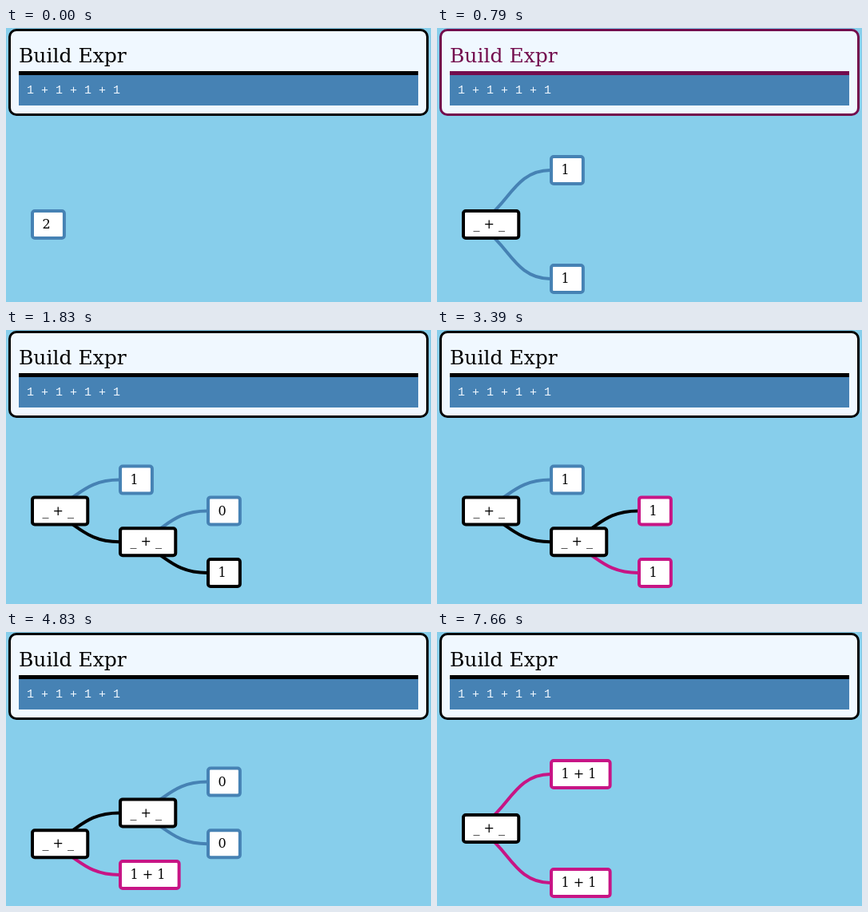
Write an HTML page that moves like this. It is 532 px wide and 343 px high and loops after 8000 ms.

```html
<!DOCTYPE html>
<html lang="en">
<head>
<meta charset="utf-8">
<title>Build Expr</title>
<style>
  html, body { margin: 0; width: 100%; height: 100%; overflow: hidden; background: #87ceeb; }
  svg { display: block; width: 532px; height: 343px; }
  text { font-family: "DejaVu Serif", serif; font-size: 16px; }
  .panel { fill: #f0f8ff; stroke: var(--ink, #000); stroke-width: 3; }
  .title { font-size: 25px; fill: var(--ink, #000); }
  .rule { fill: var(--ink, #000); }
  .code { font-family: "Liberation Mono", monospace; font-size: 15px; fill: #f0f8ff; }
  .edge { fill: none; stroke-width: 4; }
  .box { fill: #fff; stroke-width: 4; }
</style>
</head>
<body>
<svg viewBox="0 0 532 343">
  <rect class="panel" x="4.5" y="2.5" width="523" height="106" rx="8.5"/>
  <text class="title" x="16" y="43">Build Expr</text>
  <rect class="rule" x="16" y="54" width="500" height="5"/>
  <rect x="16" y="59" width="500" height="38" fill="#4682b4"/>
  <text class="code" x="26" y="82">1 + 1 + 1 + 1</text>
  <g id="edges"></g>
  <g id="nodes"></g>
</svg>
<script>
const LOOP = 8000, MOVE = 220;
const FLASH = { start: 30, half: 525 };
const COLORS = { todo: [70, 130, 180], open: [0, 0, 0], done: [199, 21, 133] };
const PARENT = { a0: 'a', a1: 'a', b0: 'b', b1: 'b', a: 'r', b: 'r', r: null };
const KEYS = Object.keys(PARENT);

// Vertical centres of the nodes for each tree shape
const single = { r: 246 };
const pair = { r: 246, a: 178, b: 314 };
const low = { r: 226.4, a: 187.6, b: 265.2, b0: 226.4, b1: 304 };
const high = { r: 265.2, a: 226.4, b: 304, a0: 187.6, a1: 265.2 };

const SUM = '_ + _';
const steps = [];
function step(time, layout, changes) {
  const last = steps[steps.length - 1];
  steps.push({ time, layout, nodes: { ...(last && last.nodes), ...changes } });
}
step(0, single, { r: ['2', 'todo'] });
step(470, pair, { r: [SUM, 'open'], a: ['1', 'todo'], b: ['1', 'todo'] });
step(1030, low, { b: [SUM, 'open'], b0: ['0', 'todo'], b1: ['0', 'todo'] });
step(1600, low, { b1: ['1', 'open'] });
step(2260, low, { b1: ['1', 'done'] });
step(2790, low, { b0: ['1', 'open'] });
step(3385, low, { b0: ['1', 'done'] });
step(3960, pair, { b: ['1 + 1', 'done'] });
step(4520, high, { a: [SUM, 'open'], a0: ['0', 'todo'], a1: ['0', 'todo'] });
step(5170, high, { a1: ['1', 'open'] });
step(5700, high, { a1: ['1', 'done'] });
step(6300, high, { a0: ['1', 'open'] });
step(6830, high, { a0: ['1', 'done'] });
step(7440, pair, { a: ['1 + 1', 'done'] });

const clamp = v => Math.max(0, Math.min(1, v));
const ease = v => v * v * (3 - 2 * v);
const lerp = (a, b, p) => a + (b - a) * p;
const rgb = c => `rgb(${c.map(Math.round).join()})`;
const mix = (a, b, p) => rgb(a.map((v, i) => lerp(v, b[i], p)));
const column = key => 31 + 110 * (key === 'r' ? 0 : key.length);

function add(parent, tag, attrs = {}) {
  const el = document.createElementNS('http://www.w3.org/2000/svg', tag);
  set(el, attrs);
  return parent.appendChild(el);
}
function set(el, attrs) {
  for (const name in attrs) el.setAttribute(name, attrs[name]);
}

const views = {};
for (const key of KEYS) {
  const group = add(document.getElementById('nodes'), 'g');
  views[key] = {
    group,
    edge: add(document.getElementById('edges'), 'path', { class: 'edge' }),
    box: add(group, 'rect', { class: 'box', x: 2, y: -17, height: 34, rx: 3 }),
    text: add(group, 'text', { x: 14.4, y: 5.2 })
  };
}

// Nodes enter from, and leave towards, their parent
function place(key, from, to, p) {
  const up = PARENT[key] || key;
  const isNew = !(key in from), isGone = !(key in to);
  const x = column(key), px = column(up);
  return {
    x: lerp(isNew ? px : x, isGone ? px : x, p),
    y: lerp(isNew ? from[up] : from[key], isGone ? to[up] : to[key], p),
    alpha: isNew ? p : isGone ? 1 - p : 1
  };
}

function drawNode(key, prev, cur, p, spots) {
  const { group, edge, box, text } = views[key];
  const spot = spots[key];
  const show = spot && spot.alpha > 0;
  group.style.display = edge.style.display = show ? '' : 'none';
  if (!show) return;

  const [label, kind] = cur.nodes[key];
  const color = COLORS[kind];
  if (text.textContent !== label) {
    text.textContent = label;
    box.setAttribute('width', text.getComputedTextLength() + 29.7);
  }
  set(group, { transform: `translate(${spot.x} ${spot.y})`, opacity: spot.alpha });
  set(box, { stroke: rgb(color) });

  const root = spots[PARENT[key]];
  if (!root) return;
  const x0 = root.x + 1, x1 = spot.x + 1, mid = (x0 + x1) / 2;
  const before = key in prev.layout ? COLORS[prev.nodes[key][1]] : color;
  set(edge, {
    d: `M${x0} ${root.y}C${mid} ${root.y} ${mid} ${spot.y} ${x1} ${spot.y}`,
    stroke: mix(before, color, p),
    opacity: spot.alpha
  });
}

function draw(t) {
  const glow = ease(clamp(1 - Math.abs(t - FLASH.start - FLASH.half) / FLASH.half));
  document.body.style.setProperty('--ink', mix(COLORS.open, COLORS.done, glow));

  let i = steps.length - 1;
  while (steps[i].time > t) i--;
  const cur = steps[i], prev = steps[Math.max(0, i - 1)];
  const p = ease(clamp((t - cur.time) / MOVE));
  const spots = {};
  for (const key of KEYS) {
    if (key in prev.layout || key in cur.layout) {
      spots[key] = place(key, prev.layout, cur.layout, p);
    }
  }
  for (const key of KEYS) drawNode(key, prev, cur, p, spots);
}

let start;
function tick(now) {
  start ??= now;
  draw((now - start) % LOOP);
  requestAnimationFrame(tick);
}
draw(0);
requestAnimationFrame(tick);
</script>
</body>
</html>
```
